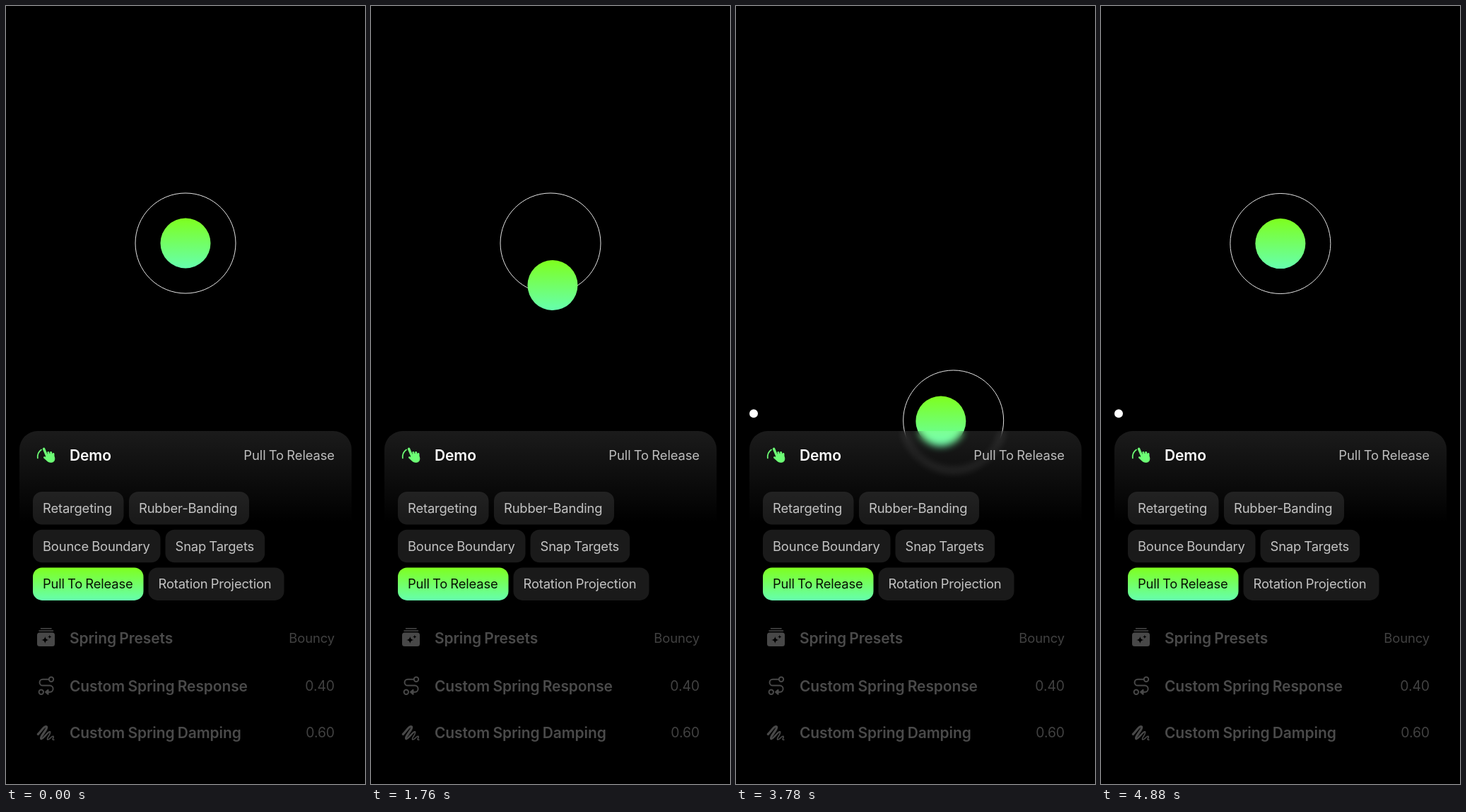
Write an HTML page that moves like this. It is 508x1102 px and loops after 4.9 s.

```html
<!DOCTYPE html>
<html lang="en">
<head>
<meta charset="utf-8">
<title>Pull To Release</title>
<style>
  html, body { margin: 0; width: 100%; height: 100%; overflow: hidden; background: #000; }
  svg { position: absolute; left: 0; top: 0; width: 508px; height: 1102px; }
  #panel {
    position: absolute; left: 19px; top: 602px; width: 470px; height: 500px;
    border-radius: 26px 26px 0 0;
    background: linear-gradient(rgba(255,255,255,.105), rgba(255,255,255,0) 130px);
    backdrop-filter: blur(5.5px);
  }
  text {
    font: 400 18.4px Inter, Roboto, sans-serif; fill: rgba(255,255,255,.74);
    letter-spacing: -.17px; word-spacing: -.8px;
  }
  .title { font-size: 21px; font-weight: 600; letter-spacing: -.12px; fill: #4a4a4a; }
  .value { text-anchor: end; letter-spacing: -.1px; fill: #414141; }
  .num { font-size: 19.4px; }
  .line { fill: none; stroke-linecap: round; stroke-linejoin: round; }
</style>
</head>
<body>
<svg viewBox="0 0 508 1102">
  <defs>
    <linearGradient id="lime" x2="0" y2="1">
      <stop offset="0" stop-color="#7eff1e"/>
      <stop offset="1" stop-color="#66ffae"/>
    </linearGradient>
  </defs>
  <circle id="ring" r="71" fill="none" stroke="#fff" stroke-width=".9"/>
  <circle id="ball" r="35.5" fill="url(#lime)"/>
  <circle id="dot" cx="25" cy="577.3" r="6" fill="#fff"/>
</svg>
<div id="panel"></div>
<svg viewBox="0 0 508 1102">
  <!-- hand -->
  <g class="line" stroke="#6dfd75">
    <path d="M44.8 640.5Q44 632.5 50 628.5" stroke-width="1.7"/>
    <path d="M53.5 627.3L59 640" stroke-width="3.4"/>
    <path d="M54.5 639.5L59 643.5" stroke-width="3"/>
    <path d="M59.8 632.5L62 640M63.6 632.5L65 640M67 634.5L67 641" stroke-width="2.9"/>
    <ellipse cx="62.6" cy="640.4" rx="6.6" ry="5.6" fill="#6dfd75" transform="rotate(35 62.6 640.4)"/>
  </g>
  <text class="title" x="90" y="643.5" style="fill:#fff">Demo</text>
  <text class="value" x="465" y="642.6" style="fill:#bdbdbd">Pull To Release</text>
  <g id="chips"></g>
  <!-- stacked cards -->
  <path class="line" d="M49.5 881.7H64M47 885H66.5" stroke="#484848" stroke-width="1.6"/>
  <rect x="44" y="887.5" width="25" height="19.5" rx="3.5" fill="#484848"/>
  <path d="M55.3 893Q55.9 897.3 60.3 898Q55.9 898.7 55.3 903Q54.7 898.7 50.3 898Q54.7 897.3 55.3 893ZM61.8 891Q62.1 893.1 64.3 893.5Q62.1 893.9 61.8 896Q61.5 893.9 59.3 893.5Q61.5 893.1 61.8 891Z"/>
  <!-- route -->
  <g class="line" stroke="#484848" stroke-width="2">
    <circle cx="64" cy="953.7" r="3.2"/>
    <circle cx="49.8" cy="971.8" r="3.2"/>
    <path d="M60.5 953.7H52A4.4 4.4 0 0 0 52 962.6H62A4.6 4.6 0 0 1 62 971.8H57"/>
    <path d="M59.5 968.8L56 971.8L59.5 974.8Z" fill="#484848"/>
  </g>
  <!-- scribble -->
  <g class="line" stroke="#484848">
    <path d="M45.3 1031.5C49 1028 54.5 1019 57.3 1020.8C60 1023 47.5 1035.5 49.8 1037.8" stroke-width="3.2"/>
    <path d="M49.8 1037.8C52 1039.5 60 1026.5 62.2 1028.3" stroke-width="2.5"/>
    <path d="M62.2 1028.3C64.5 1030.5 56.5 1037.5 58.8 1039C61 1040.3 65.3 1033 67 1034.5C68.3 1036 63.8 1039.6 67.8 1039.4" stroke-width="1.7"/>
  </g>
  <text class="title" x="90" y="902.7">Spring Presets</text>
  <text class="title" x="90" y="970.5">Custom Spring Response</text>
  <text class="title" x="90" y="1036.5">Custom Spring Damping</text>
  <text class="value" x="465" y="902">Bouncy</text>
  <text class="value num" x="465" y="970">0.40</text>
  <text class="value num" x="465" y="1036">0.60</text>
</svg>
<script>
const $ = id => document.getElementById(id);

const chips = [
  ['Retargeting', 38, 688, 128.5], ['Rubber-Banding', 174, 688, 170],
  ['Bounce Boundary', 38, 741.7, 180.5], ['Snap Targets', 225.5, 741.7, 140.7],
  ['Pull To Release', 38, 795.4, 156.5], ['Rotation Projection', 201.5, 795.4, 192]
];
$('chips').innerHTML = chips.map(([label, x, y, w], i) => {
  const on = i === 4;
  return `<rect x="${x}" y="${y}" width="${w}" height="46.5" rx="13"
    fill="${on ? 'url(#lime)' : 'rgba(255,255,255,.1)'}"/>
    <text x="${x + 14}" y="${y + 30}"${on ? ' style="fill:#071203"' : ''}>${label}</text>`;
}).join('');

const LOOP = 4900, SNAP = 2440, BACK = 4270, LAG = 30;
const HOME = [254, 336], FLICK = [0, -800];

// time, x, y
const pull = [
  [0, 254, 336], [330, 254, 336], [860, 256, 362.5], [1160, 257, 374.5],
  [1390, 257, 381.5], [1760, 257, 395.5], [1900, 257.2, 401], [SNAP, 258, 416.5]
];
const finger = [
  [SNAP, 259, 590], [2820, 260, 591], [3000, 261.5, 597], [3510, 262, 597],
  [3650, 266, 592], [3750, 289.5, 588], [3780, 307.5, 587], [3860, 315, 582],
  [4020, 316.5, 612], [4090, 317, 680], [4120, 299.5, 692.5],
  [4165, 258, 680], [4220, 214, 634], [BACK, 200, 580]
];

// Monotone cubic through the keys
function at(keys, t) {
  const last = keys.length - 1;
  t = Math.min(Math.max(t, keys[0][0]), keys[last][0]);
  let i = 0;
  while (i < last - 1 && t > keys[i + 1][0]) i++;
  const h = keys[i + 1][0] - keys[i][0], u = (t - keys[i][0]) / h;
  return [1, 2].map(c => {
    const slope = k => k < 0 || k >= last ? 0
      : (keys[k + 1][c] - keys[k][c]) / (keys[k + 1][0] - keys[k][0]);
    const tangent = k => {
      const a = slope(k - 1), b = slope(k);
      return a * b > 0 ? 2 * a * b / (a + b) : k === 0 ? b : k === last ? a : 0;
    };
    const p = keys[i][c], q = keys[i + 1][c], m = tangent(i) * h, n = tangent(i + 1) * h;
    return p + u * m + u * u * (3 * (q - p) - 2 * m - n) + u * u * u * (2 * (p - q) + m + n);
  });
}

// Spring with response 0.40 and damping 0.60: remaining offset after ms
function spring(offset, velocity, ms) {
  const w = 2 * Math.PI / 0.4, decay = 0.6 * w, wd = 0.8 * w, s = ms / 1000;
  return Math.exp(-decay * s) *
    (offset * Math.cos(wd * s) + (velocity + decay * offset) / wd * Math.sin(wd * s));
}

function place(t, start, lag) {
  if (t < BACK) {
    const base = at(finger, SNAP);
    return at(finger, t - lag).map((p, c) => p + spring(start[c] - base[c], 0, t - SNAP));
  }
  return at(finger, BACK - lag).map((p, c) => HOME[c] + spring(p - HOME[c], FLICK[c], t - BACK));
}

function move(el, [x, y]) {
  el.setAttribute('cx', x);
  el.setAttribute('cy', y);
}

function draw() {
  const t = performance.now() % LOOP, free = t >= SNAP;
  move($('ring'), free ? place(t, HOME, 0) : HOME);
  move($('ball'), free ? place(t, at(pull, SNAP), LAG) : at(pull, t));
  $('dot').style.display = free ? '' : 'none';
  requestAnimationFrame(draw);
}
draw();
</script>
</body>
</html>
```
